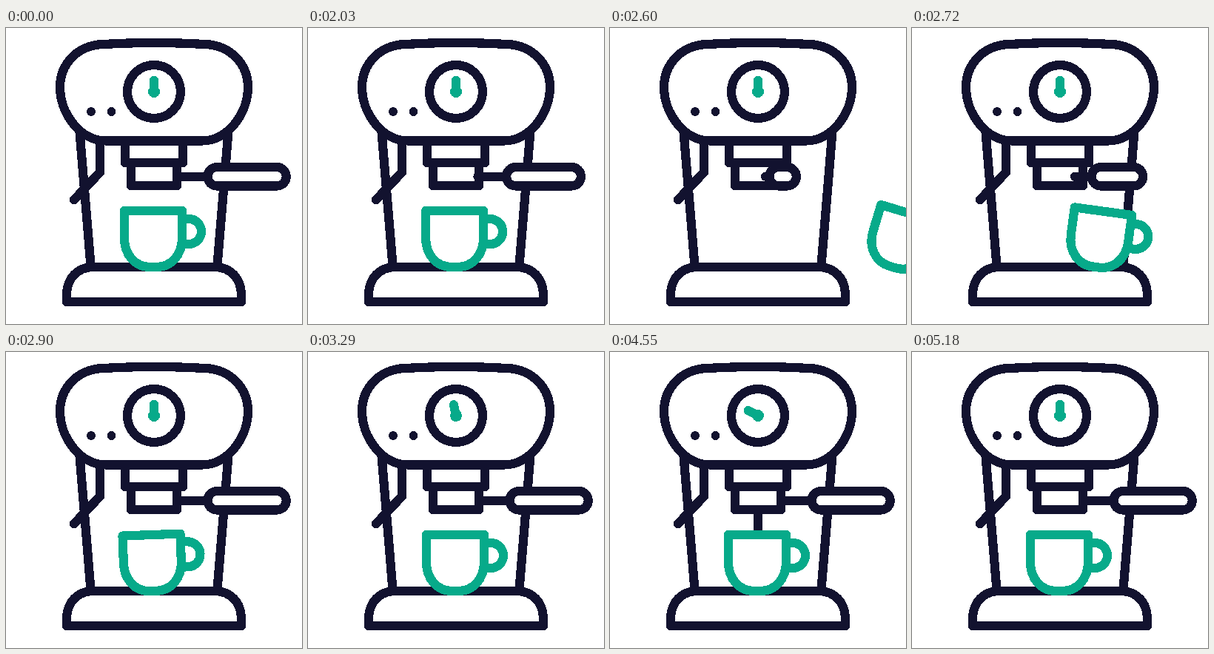
Write an HTML page that moves like this. It is 400x400 px and loops after 5.21 s.

```html
<!DOCTYPE html>
<html lang="en">
<head>
<meta charset="utf-8">
<title>Espresso machine</title>
<style>
html, body { margin: 0; width: 100%; height: 100%; overflow: hidden; background: #fff; }
svg { display: block; width: 100vw; height: 100vh; shape-rendering: crispEdges; }
.ink { stroke: #12122f; }
.green { stroke: #07aa8a; }
.dot { fill: #12122f; stroke: none; }
</style>
</head>
<body>
<svg viewBox="0 0 400 400" fill="none" stroke-width="12.2" stroke-linecap="round" stroke-linejoin="round">
  <g class="ink">
    <path d="M99.5 140L114.5 321M300.5 140L285.5 321"/>
    <path d="M127 155V195L92 232"/>
    <path d="M161 155V182H239V155M169 182V213H231V182"/>
    <path d="M130 22Q200 18 270 22C305 24 327 50 327 80C327 115 300 152.5 265 152.5H135C100 152.5 73 115 73 80C73 50 95 24 130 22Z" fill="#fff"/>
    <path d="M82 370V361C82 338 97 323 118 323H282C303 323 318 338 318 361V370Z"/>
    <circle cx="200" cy="86" r="36"/>
    <circle class="dot" cx="115" cy="113" r="6"/>
    <circle class="dot" cx="142.5" cy="113" r="6"/>
    <path id="rod"/>
    <rect id="grip" y="188" height="25.5" rx="12.75" fill="#fff"/>
    <path id="stream" stroke-linecap="butt"/>
  </g>
  <g id="needle" class="green">
    <path d="M200 71V86"/>
    <circle cx="200" cy="86" r="8" fill="#07aa8a" stroke="none"/>
  </g>
  <g id="cup" class="green">
    <path d="M238 258H247a17 17 0 0 1 0 34H236"/>
    <path d="M160 247H238V284C238 307 223 323 203 323H195C175 323 160 307 160 284Z" fill="#fff"/>
  </g>
</svg>
<script>
const LOOP = 5210;
const el = id => document.getElementById(id);
const set = (id, attrs) => {
  for (const key in attrs) el(id).setAttribute(key, attrs[key]);
};
const span = (t, from, to) => Math.min(1, Math.max(0, (t - from) / (to - from)));
const smooth = u => u * u * (3 - 2 * u);

// The grip swings towards the viewer until it is seen end-on, then back.
function drawGrip(t) {
  const swing = t < 2528
    ? Math.sin(span(t, 2008, 2528) * Math.PI / 2)
    : 1 - smooth(span(t, 2528, 2900));
  const shift = 141 * swing;
  const left = 272.5 - 0.45 * shift;
  const right = 378.7 - shift;
  set("grip", { x: left, width: right - left });
  set("rod", { d: `M${231 - 0.165 * shift} 200.7H${left}` });
}

// The cup leaves to the left, returns from the right and rocks to rest.
function drawCup(t) {
  let x, tilt;
  if (t < 2540) {
    const u = span(t, 2000, 2510);
    x = -15 * u - 288 * u ** 3;
    tilt = 16 * u ** 1.7;
  } else {
    x = 300 * (1 - span(t, 2540, 2940)) ** 3;
    const age = Math.min(t - 2540, 540);
    tilt = 20 * Math.cos(age / 300 * Math.PI / 2) * (1 - age / 540);
  }
  set("cup", { transform: `translate(${x} 0) rotate(${tilt} 199 323)` });
}

function drawBrew(t) {
  const turn = smooth(span(t, 3050, 4100)) - smooth(span(t, 4190, 5180));
  set("needle", { transform: `rotate(${-90 * turn} 200 86)` });
  const head = 215 + 35 * span(t, 3450, 3700) ** 2;
  const tail = 215 + 35 * span(t, 4500, 4750) ** 2;
  set("stream", { d: head > tail ? `M200 ${tail}V${head}` : "" });
}

const start = performance.now();
function frame() {
  const t = (performance.now() - start) % LOOP;
  drawGrip(t);
  drawCup(t);
  drawBrew(t);
  requestAnimationFrame(frame);
}
frame();
</script>
</body>
</html>
```
